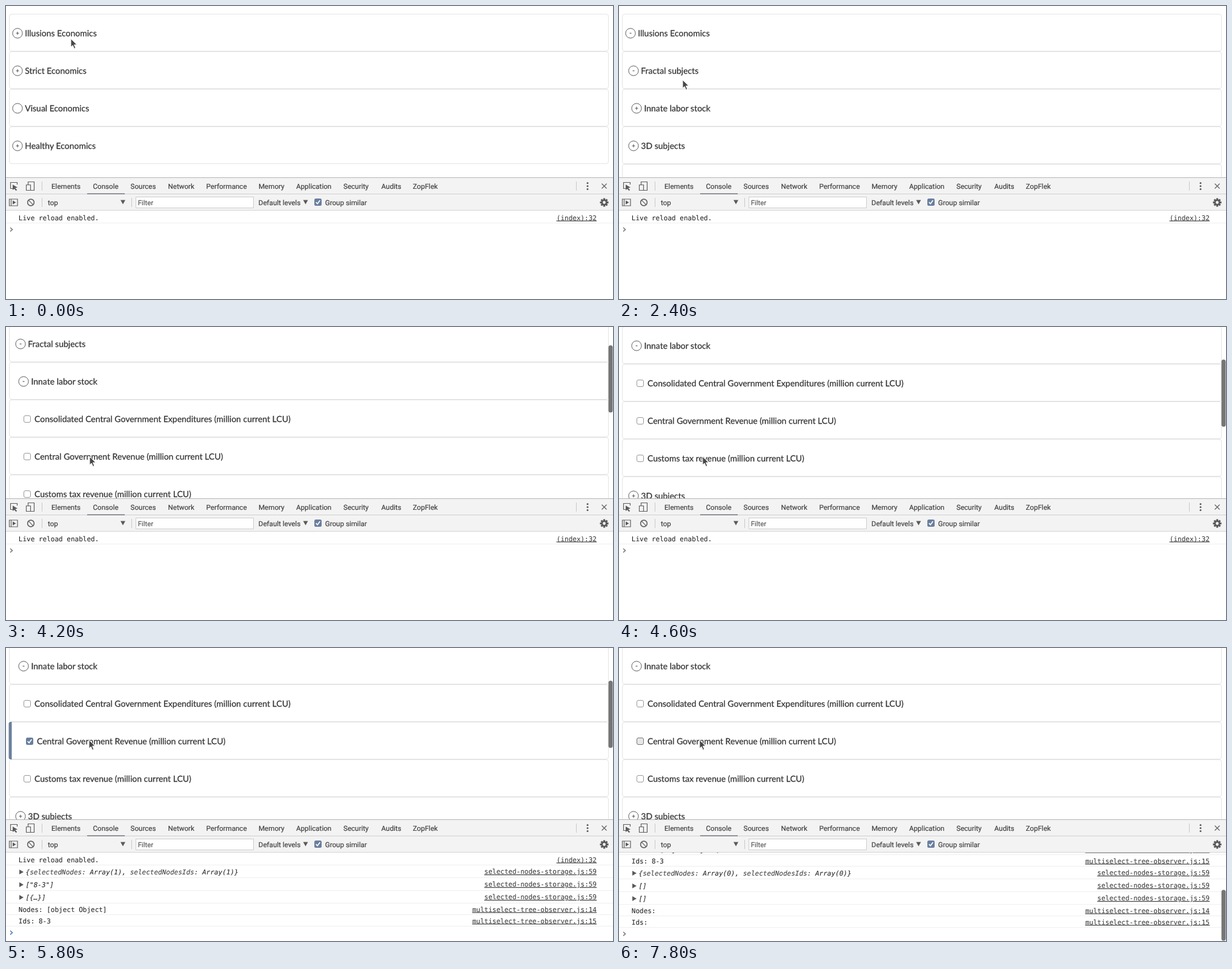
These frames come from a looping animation (1002 by 484 pixels, 8000 ms). An HTML page:

```html
<!DOCTYPE html>
<html lang="en">
<head>
<meta charset="utf-8">
<title>Tree select with console</title>
<style>
  html, body { margin: 0; width: 100%; height: 100%; overflow: hidden; background: #fff; }
  svg { display: block; }
  text { text-rendering: geometricPrecision; }
  .tree text { font: 14px Lato, sans-serif; fill: #333; stroke: #333; stroke-width: .25px; }
  .ui text { font: 11.6px Roboto, sans-serif; fill: #404040; stroke: #404040; stroke-width: .2px; }
  .log text { font: 11px "DejaVu Sans Mono", monospace; fill: #2b2b2b; stroke: #2b2b2b; stroke-width: .1px; }
  .log .link { text-anchor: end; text-decoration: underline; fill: #484848; }
  .log .object { font-style: italic; }
  .log .key { fill: #484848; }
  .icon { fill: none; stroke: #606060; stroke-width: 1.2; }
  .solid { fill: #5a5a5a; }
</style>
</head>
<body>
<svg width="1002" height="484" viewBox="0 0 1002 484">
  <defs>
    <clipPath id="page"><rect width="1002" height="283"/></clipPath>
    <clipPath id="console"><rect y="338" width="1002" height="146"/></clipPath>
  </defs>
  <g class="tree" clip-path="url(#page)"><g id="rows"></g></g>
  <g class="log" clip-path="url(#console)"><g id="log"></g></g>
  <g class="ui" id="ui"></g>
  <rect id="pageThumb" x="994.5" width="7" height="111" rx="3.5" fill="#757575"/>
  <rect id="logThumb" x="994.5" y="399.5" width="7" height="84" rx="3.5" fill="#757575"/>
  <path id="cursor" d="M0 0V14L3.2 11L5.6 16.4L8 15.4L5.6 10H10.2Z" fill="#484848" stroke="#fff" stroke-width="1"/>
</svg>
<script>
const DURATION = 8000, STEP = 200, ROW = 62;
const OPEN_TIMES = [1400, 2000, 3000];
const CHECK = 5400, UNCHECK = 7000;

// Each key is [time, ...values]
const CURSOR = [[0, 107, 54], [1200, 107, 54], [1400, 107, 53], [1600, 106, 75], [1800, 105, 108],
  [2000, 105, 120], [2200, 105, 122], [2400, 105, 122], [2800, 118, 168], [3000, 122, 177],
  [3200, 126, 182], [3600, 138, 214], [4600, 138, 214], [5200, 137, 154], [5400, 137, 152],
  [6200, 137, 152], [6600, 133, 152]];
const SCROLL = [[3800, 0], [4000, 26], [4200, 79], [4400, 120], [4600, 138], [4800, 139]];
const PAGE_THUMB = [[3800, 0], [4000, 1], [6000, 1], [6600, 0]];

const $ = id => document.getElementById(id);
const text = (x, y, str, cls = '') => `<text class="${cls}" x="${x}" y="${y}">${str}</text>`;
const rect = (x, y, w, h, attrs) => `<rect x="${x}" y="${y}" width="${w}" height="${h}" ${attrs}/>`;
const path = (d, cls = 'icon') => `<path class="${cls}" d="${d}"/>`;
const line = (y, color) => rect(0, y, 1002, 1, `fill="${color}"`);

function valueAt(keys, t) {
  if (t <= keys[0][0]) return keys[0].slice(1);
  const i = keys.findIndex(key => key[0] > t);
  if (i < 0) return keys.at(-1).slice(1);
  const a = keys[i - 1], b = keys[i], p = (t - a[0]) / (b[0] - a[0]);
  return a.slice(1).map((v, k) => v + (b[k + 1] - v) * p);
}

function checkbox(x, y, { checked, hover } = {}) {
  if (!checked) return rect(x + .5, y + .5, 11, 11, `rx="2.5" fill="${hover ? '#e6e6e6' : '#fff'}" stroke="${hover ? '#777' : '#999'}"`);
  return rect(x, y, 12, 12, 'rx="2.5" fill="#697f9f"') +
    `<path d="M${x + 2.7} ${y + 6.2}l2.4 2.5l4.2-5.6" fill="none" stroke="#fff" stroke-width="1.7"/>`;
}

function treeRow({ label, depth = 0, sign, leaf, checked, hover }, i) {
  const y = 13 + i * ROW, shift = checked ? 4 : 0;
  const box = rect(5.5, y + .5, 989, ROW - 1, 'rx="3.5" fill="#fff" stroke="#e4e4e4"') +
    (checked ? `<path d="M9.5 ${y}H8Q4.5 ${y} 4.5 ${y + 3}V${y + ROW - 3}Q4.5 ${y + ROW} 8 ${y + ROW}H9.5Z" fill="#6a7f9b"/>` : '');
  if (leaf) return box + checkbox(29 + shift, y + 26, { checked, hover }) + text(47 + shift, y + 36.5, label);
  const cx = 19 + depth * 5, cy = y + 32;
  const mark = { '+': `M${cx - 2.5} ${cy}h5M${cx} ${cy - 2.5}v5`, '-': `M${cx - 1.5} ${cy}h3` }[sign];
  return box + `<circle class="icon" style="stroke-width:1" cx="${cx}" cy="${cy}" r="8.1"/>` +
    (mark ? path(mark) : '') + text(31.2 + depth * 5.1, y + 36.5, label);
}

function treeRows(t) {
  const open = OPEN_TIMES.map(time => t >= time);
  const sign = k => open[k] ? '-' : '+';
  const leaf = label => ({ label: label + ' (million current LCU)', leaf: true });
  const revenue = { ...leaf('Central Government Revenue'), checked: t >= CHECK && t < UNCHECK, hover: t >= 5200 };
  return [
    { label: 'Illusions Economics', sign: sign(0) },
    open[0] && { label: 'Fractal subjects', depth: 1, sign: sign(1) },
    open[1] && { label: 'Innate labor stock', depth: 2, sign: sign(2) },
    ...(open[2] ? [leaf('Consolidated Central Government Expenditures'), revenue, leaf('Customs tax revenue')] : []),
    open[0] && { label: '3D subjects', depth: 1, sign: '+' },
    { label: 'Strict Economics', sign: '+' },
    { label: 'Visual Economics' },
    { label: 'Healthy Economics', sign: '+' }
  ].filter(Boolean).map(treeRow).join('');
}

function selectionLogs(count, ids, nodes, idText, nodeText) {
  const key = name => `<tspan class="key">${name}:</tspan> Array(${count})`;
  const storage = 'selected-nodes-storage.js:59', observer = 'multiselect-tree-observer.js:';
  return [
    [`{${key('selectedNodes')}, ${key('selectedNodesIds')}}`, storage, true],
    [ids, storage, true],
    [nodes, storage, true],
    ['Nodes:' + nodeText, observer + 14],
    ['Ids:' + idText, observer + 15]
  ];
}

function logRows(t) {
  const logs = [['Live reload enabled.', '(index):32']];
  if (t >= CHECK) logs.push(...selectionLogs(1, '["8-3"]', '[{…}]', ' 8-3', ' [object Object]'));
  if (t >= UNCHECK) logs.push(...selectionLogs(0, '[]', '[]', '', ''));
  let y = 340, out = '';
  for (const [message, link, isObject] of logs) {
    out += isObject
      ? path(`M22 ${y + 7}l7 4l-7 4z`, 'solid') + text(32.5, y + 15, message, 'object')
      : text(20.8, y + 13.5, message);
    out += text(975, y + (isObject ? 14 : 13.5), link, 'link');
    y += isObject ? 21 : 19;
    out += line(y - 1, '#efefef');
  }
  const focused = t >= CHECK && t < 6400;
  return out + `<path d="M7 ${y + 7}l3.5 3.2l-3.5 3.2" fill="none" stroke="${focused ? '#4a78b8' : '#777'}" stroke-width="1.5"/>`;
}

function devtools() {
  const tabs = [['Elements', 75], ['Console', 143.5], ['Sources', 205.5], ['Network', 267.5], ['Performance', 330.5],
    ['Memory', 417], ['Application', 479], ['Security', 557], ['Audits', 619.5], ['ZopFlek', 671.5]];
  const divider = (x, y) => rect(x, y, 1, 15, 'fill="#c8c8c8"');
  const dropdown = (x, y) => path(`M${x} ${y}h8l-4 7z`, 'solid');
  const teeth = [0, 45, 90, 135].map(a =>
    rect(985.9, 317.5, 3.2, 14, `class="solid" transform="rotate(${a} 987.5 324.5)"`)).join('');
  return rect(0, 283, 1002, 55, 'fill="#f3f3f3"') +
    line(283, '#b4b4b4') + line(310, '#cfcfcf') + line(337, '#d4d4d4') +
    rect(134, 309.5, 62, 1.5, 'fill="#70737e"') +
    tabs.map(([label, x]) => text(x, 302, label)).join('') +
    // Inspect and device icons
    path('M11 301.5H7.5V291.5H18.5V295') + path('M11 295v9l2.6-2l3 3.2l1.6-1.5l-3-3l3.8-1z', 'solid') +
    path('M36.5 295V290.5H46.5V304.5H41') + path('M33.5 295.5H40.5V304.5H33.5Z') +
    divider(59, 290) + divider(941, 290) +
    [292.5, 297.5, 302.5].map(y => `<circle class="solid" cx="960" cy="${y}" r="1.5"/>`).join('') +
    path('M983.5 293.5l8 8m0-8l-8 8') +
    // Console toolbar
    path('M5.5 319H19V330H5.5ZM8.5 319V330') + path('M11 321.3l5.5 3.2l-5.5 3.2z', 'solid') +
    '<circle class="icon" cx="41" cy="324.5" r="5.4" style="stroke-width:1.6"/>' +
    path('M37.2 320.7l7.6 7.6') +
    divider(59, 317) + divider(207, 317) +
    text(69, 329, 'top') + dropdown(189, 320.5) +
    rect(214.5, 315.5, 194, 18, 'fill="#fff" stroke="#cdcdcd"') +
    '<text x="217.8" y="329" style="fill:#686868;font-size:11.3px">Filter</text>' +
    text(416.8, 329, 'Default levels') + dropdown(490.5, 320.5) +
    checkbox(509, 318, { checked: true }) +
    text(526.8, 329, 'Group similar') +
    teeth + '<circle cx="987.5" cy="324.5" r="3.7" fill="#f3f3f3" stroke="#5a5a5a" stroke-width="2.6"/>';
}

let shown = -1;
function draw(t) {
  const [scroll] = valueAt(SCROLL, t), [x, y] = valueAt(CURSOR, t);
  $('rows').innerHTML = treeRows(t);
  $('rows').setAttribute('transform', `translate(0 ${-scroll})`);
  $('log').innerHTML = logRows(t);
  $('log').setAttribute('transform', `translate(0 ${t >= UNCHECK ? -99 : 0})`);
  $('pageThumb').setAttribute('y', -1 + scroll * .396);
  $('pageThumb').setAttribute('opacity', valueAt(PAGE_THUMB, t)[0]);
  $('logThumb').setAttribute('opacity', t >= UNCHECK ? 1 : 0);
  $('cursor').setAttribute('transform', `translate(${Math.round(x)} ${Math.round(y)})`);
}

function tick() {
  const t = Math.floor(performance.now() % DURATION / STEP) * STEP;
  if (t !== shown) draw(shown = t);
  requestAnimationFrame(tick);
}

$('ui').innerHTML = devtools();
tick();
</script>
</body>
</html>
```
